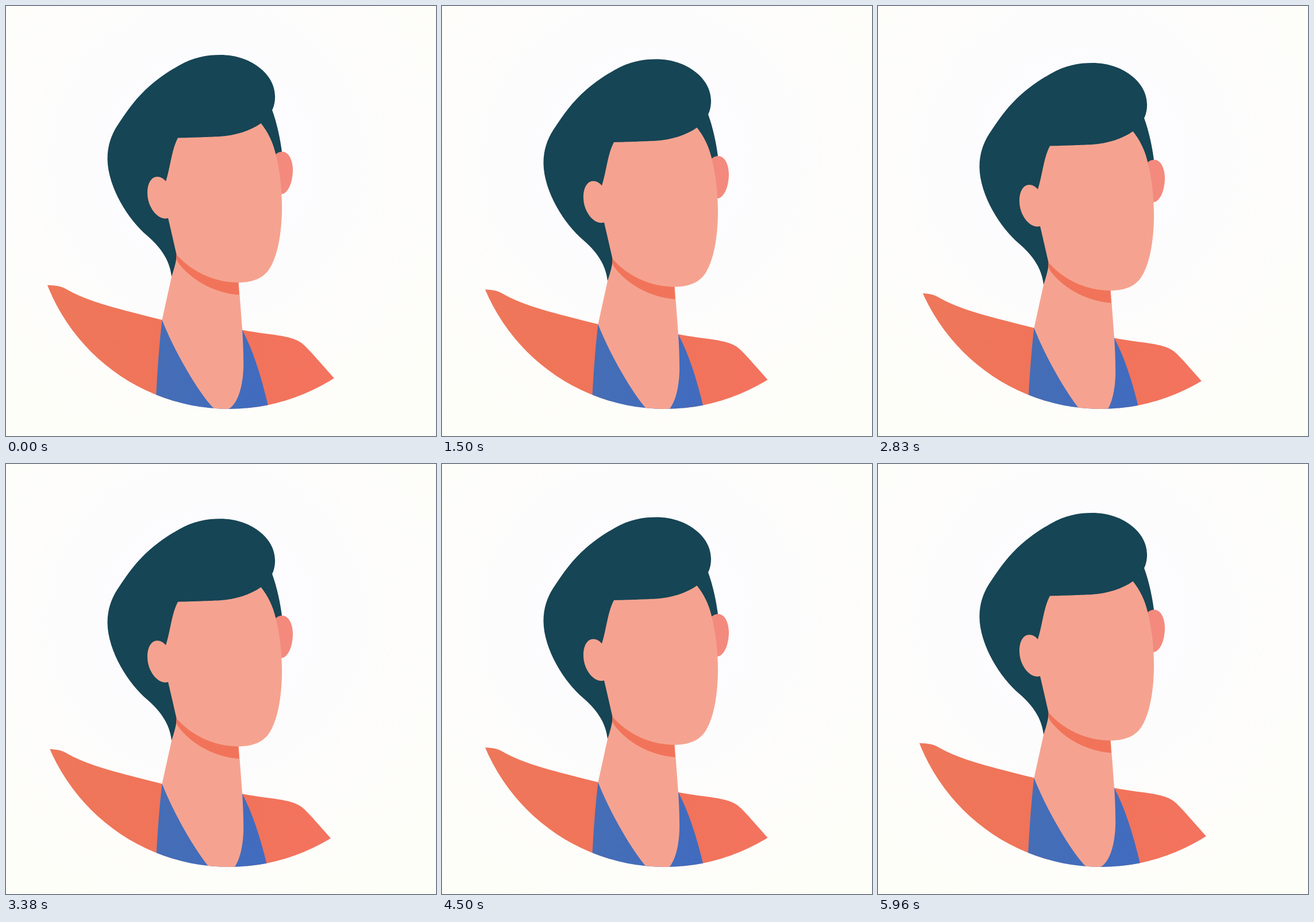
These frames come from a looping animation (748 by 748 pixels, 6000 ms). An HTML page with a canvas:

```html
<!DOCTYPE html>
<html lang="en">
<head>
<meta charset="utf-8">
<title>Portrait</title>
<style>
  html, body { margin: 0; width: 100%; height: 100%; overflow: hidden; background: #fdfcfc; }
  canvas { display: block; width: 748px; height: 748px; }
</style>
</head>
<body>
<canvas id="stage" width="748" height="748"></canvas>
<script>
const ctx = document.getElementById('stage').getContext('2d');
const SIZE = 748;
const LOOP = 6000;
const BOB = 2000;
const HEIGHT = 15;
const FRAME = 1000 / 24;

function gradient(g, from, to) {
  g.addColorStop(0, from);
  g.addColorStop(1, to);
  return g;
}

const across = (x0, x1, from, to) =>
  gradient(ctx.createLinearGradient(x0, 0, x1, 0), from, to);

const backdrop = gradient(ctx.createRadialGradient(350, 270, 120, 350, 270, 560), '#fcfbfe', '#fefef8');

// The bust is seen through a fixed disc.
const disc = new Path2D();
disc.arc(387.9, 361.5, 339.4, 0, Math.PI * 2);

const layers = [
  // hair
  ['#164555', `M288 471 C285 440 266 417 245 399 C214 373 177 316 176.5 266
    C176.5 243 183 225 193 209 C212 180 228 158 250 139 C268 123 286 112 300 104
    C325 89 350 85 373 85 C425 85 468 118 468 157 C468 167 466 175 463 181
    C471 203 477 230 480 254 L470 258 L440 300 L300 300 L300 440 Z`],
  // coat, left and right
  [across(72, 271, '#ee775a', '#f07459'), `M50 484 L72 485.5 C85 486 95 487 103 491.5
    C140 514 200 528 271.5 546 L300 720 L50 720 Z`],
  [across(411, 571, '#f2735a', '#f3735f'), `M411 563.5 C440 569 462 571 480 574
    C495 577 505 580 513 585.5 C523 592 547 621 571 647.5 L630 713 L420 720 Z`],
  // shirt
  [across(261, 456, '#456eb6', '#416bbf'), `M271.5 546 Q264.5 605 260.5 690 L259 720
    L462 720 L457 700 Q437 612 411 563.5 Z`],
  // neck
  ['#f5a390', `M296.5 432 Q298 440 288 471 L271.5 546 C295 606 340 680 362 700
    Q375 705 389 700 C410 685 414 640 413 615 C413 598 412 580 411 563.5 L404 470 Z`],
  // shadow under the jaw
  ['#f1745a', `M296.5 432 C295 440 299 446 303 451 C327 480 367 500 405.5 502.5
    L404 478 L360 460 Z`],
  // far ear
  ['#f38a7d', `M465 262 C470 256 475 253.5 481 253.5 C492 254 499 268 499 287
    C498 310 490 326 479 327.5 L460 300 Z`],
  // face and near ear
  ['#f5a390', `M299 229.5 C335 228.5 350 228 372 227 C400 225 425 217 443.5 204
    C456 220 464 236 469 257 C476 285 480 318 480 350 C480 385 475 430 459 456
    C449 473 430 481 404 481 C362 481 321 461 296.5 432 C292 412 287 390 282 369
    C266 374 246 352 246 325 C246 308 253 297 263 297 C269 297 274 300 278 305
    C286 281 288 250 299 229.5 Z`]
].map(([fill, d]) => [fill, new Path2D(d)]);

// 24 steps a second, each starting on a whole 10 ms.
const startOf = k => Math.round(k * FRAME / 10) * 10;

function stepAt(t) {
  let k = Math.floor(t / FRAME) + 1;
  while (startOf(k) > t) k--;
  return k * FRAME;
}

function draw(now) {
  const t = stepAt(now % LOOP);
  const dy = HEIGHT / 2 * (1 - Math.cos(t / BOB * Math.PI * 2));

  ctx.fillStyle = backdrop;
  ctx.fillRect(0, 0, SIZE, SIZE);
  ctx.save();
  ctx.clip(disc);
  ctx.translate(0, dy);
  for (const [fill, path] of layers) {
    ctx.fillStyle = fill;
    ctx.fill(path);
  }
  ctx.restore();
}

let start = null;
function tick(now) {
  if (start === null) start = now;
  draw(Math.max(0, now - start));
  requestAnimationFrame(tick);
}

draw(0);
requestAnimationFrame(tick);
</script>
</body>
</html>
```
